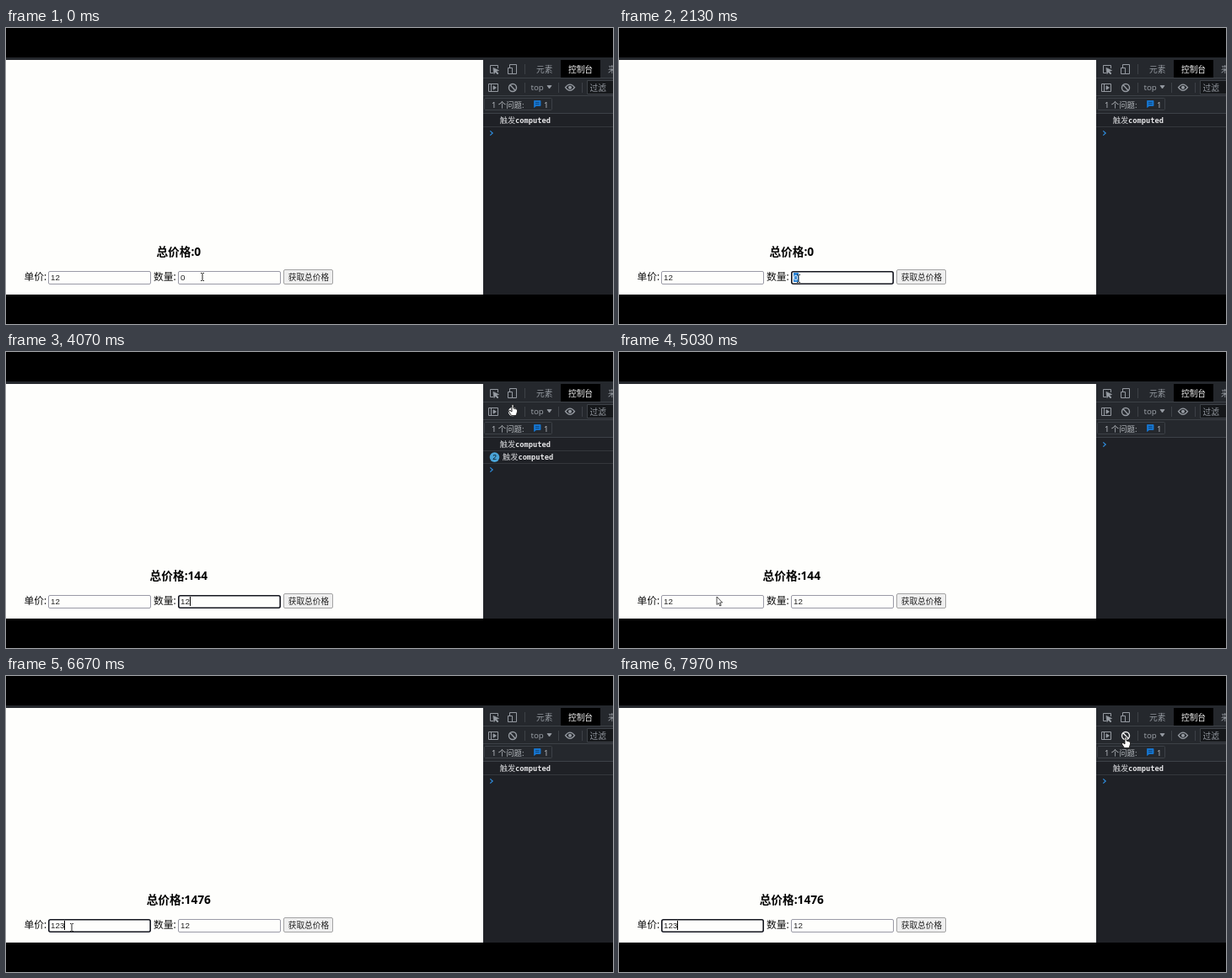
Animation of 720x352 px, one loop 8000 ms. Source, as an HTML page with a canvas:

```html
<!DOCTYPE html>
<html lang="zh-CN">
<head>
<meta charset="utf-8">
<title>Computed total</title>
<style>
  html, body { margin: 0; width: 100%; height: 100%; overflow: hidden; background: #000; }
  canvas { display: block; }
</style>
</head>
<body>
<canvas id="stage" width="720" height="352"></canvas>
<script>
const ctx = document.getElementById('stage').getContext('2d');
const LOOP = 8000;
const SANS = '"Noto Sans", "Noto Sans CJK SC", sans-serif';
const UI = '"Liberation Sans", "Noto Sans CJK SC", sans-serif';
const MONO = '"DejaVu Sans Mono", "Noto Sans CJK SC", monospace';
const PAGE = '#fefefc', PANEL = '#1f2126', BAR = '#25282d', LINE = '#3d4147', ICON = '#969ba2';

// Moments of the user's actions, in ms
const FOCUS_COUNT = 780, SELECT = 980, TYPE_1 = 2380, TYPE_2 = 2550;
const CLEAR = 4260, FOCUS_PRICE = 5500, TYPE_3 = 6450;

// Pointer path: time, x, y
const path = [
  [0, 233, 296], [350, 233, 296], [780, 213, 298], [2600, 213, 298],
  [2930, 496, 182], [3150, 496, 182], [3700, 601, 62], [4350, 601, 62],
  [5000, 116, 291], [5060, 116, 291], [5400, 78, 299], [6900, 78, 299],
  [7600, 601, 72], [LOOP, 601, 72]
];

function rect(x, y, w, h, color) {
  ctx.fillStyle = color;
  ctx.fillRect(x, y, w, h);
}

function box(x, y, w, h, fill, stroke, width = 1, radius = 0) {
  ctx.beginPath();
  ctx.roundRect(x, y, w, h, radius);
  if (fill) { ctx.fillStyle = fill; ctx.fill(); }
  if (stroke) { ctx.strokeStyle = stroke; ctx.lineWidth = width; ctx.stroke(); }
}

function text(str, x, y, size, color, family = UI, weight = 400, align = 'left') {
  ctx.font = `${weight} ${size}px ${family}`;
  ctx.textAlign = align;
  ctx.fillStyle = color;
  ctx.fillText(str, x, y);
}

function line(d, color, width = 1) {
  ctx.strokeStyle = color;
  ctx.lineWidth = width;
  ctx.stroke(new Path2D(d));
}

function shape(d, fill, stroke) {
  const p = new Path2D(d);
  ctx.fillStyle = fill;
  ctx.fill(p);
  ctx.strokeStyle = stroke;
  ctx.lineWidth = 0.8;
  ctx.stroke(p);
}

function field(x, value, focused, selected, caretAge) {
  if (focused) box(x + .8, 289.8, 120.4, 14.4, PAGE, '#14161f', 1.6, 2);
  else box(x + .5, 289.5, 121, 15, PAGE, '#9a9aa6', 1, 1.5);
  if (selected) rect(x + 3, 291, 6, 11, '#2f86d6');
  text(value, x + 3, 300, 9.8, selected ? '#fff' : '#222');
  if (focused && !selected && caretAge % 1060 < 530) {
    rect(Math.round(x + 3 + ctx.measureText(value).width), 291, 1, 11, '#000');
  }
}

function page(t) {
  rect(0, 35, 720, 3, BAR);
  rect(0, 38, 566, 279, PAGE);
  const price = t < TYPE_3 ? '12' : '123';
  const count = t < TYPE_1 ? '0' : t < TYPE_2 ? '1' : '12';
  text('总价格:' + price * count, 204.8, 270.7, 13.7, '#000', SANS, 700, 'center');
  text('单价:', 21.5, 300, 11.8, '#111', SANS);
  text('数量:', 175, 300, 11.8, '#111', SANS);
  const countTouched = t < TYPE_1 ? FOCUS_COUNT : t < TYPE_2 ? TYPE_1 : TYPE_2;
  const priceTouched = t < TYPE_3 ? FOCUS_PRICE : TYPE_3;
  field(50, price, t >= FOCUS_PRICE, false, t - priceTouched);
  field(204, count, t >= FOCUS_COUNT && t < CLEAR, t >= SELECT && t < TYPE_1, t - countTouched);
  box(329.5, 287.5, 58, 17, '#efefef', '#a3a3a3', 1, 1.5);
  text('获取总价格', 334.7, 299.7, 9.7, '#222');
}

function toolbar(clearHovered) {
  rect(566, 38, 154, 279, PANEL);
  rect(566, 38, 154, 64, BAR);
  rect(658, 38, 47, 21, '#000');
  for (const y of [59, 80, 101]) rect(566, y, 154, 1, LINE);
  for (const [x, y] of [[615, 43], [615, 65], [655, 65], [683, 65]]) rect(x, y, 1, 12, LINE);

  // Inspect and device icons
  line('M578 53.5H574.5V44.5H583.5V48', ICON);
  shape('M578 47.5L584.5 50.5L581.5 51.3L584 54L583 55L580.5 52.2L579 54.5Z', ICON, ICON);
  line('M597.5 47V43.5H605.5V54.5H600.5M595.5 47.5H600.5V54.5H595.5Z', ICON);
  text('元素', 629, 52.5, 9.7, ICON);
  text('控制台', 667, 52.5, 9.7, '#f4f4f4');
  text('来源', 714, 52.5, 9.7, ICON);

  // Sidebar, clear and eye icons
  line('M572.5 66.5H583.5V75.5H572.5ZM575.5 66.5V75.5', ICON);
  shape('M578 68.8L581.5 71L578 73.2Z', ICON, ICON);
  line('M605.5 71A4.5 4.5 0 1 1 596.5 71A4.5 4.5 0 1 1 605.5 71M598 67.8L604 74.2',
    clearHovered ? '#f2f2f2' : ICON, 1.4);
  text('top', 622.5, 74, 9.7, ICON, SANS);
  shape('M642 68.5H647L644.5 72Z', ICON, ICON);
  line('M663.5 70.7Q669 63.5 674.5 70.7Q669 78 663.5 70.7Z', ICON, 1.3);
  box(667, 68.7, 4, 4, ICON, null, 0, 2);
  box(689.5, 62.5, 40, 16, '#15171a', LINE);
  text('过滤', 692.5, 74.5, 9.7, ICON);

  box(567.5, 83.5, 80, 14, null, LINE, 1, 1);
  text('1 个问题:', 576, 94.5, 9.4, '#b6babf', SANS);
  shape('M626.5 86.5H634V92.5H629L626.5 94.5Z', '#1677d2', '#1677d2');
  line('M628 88.5H632.5M628 90.5H632.5', '#0c345f', .7);
  text('1', 638, 94.5, 9.4, '#b6babf', SANS);
}

function logLine(row, repeats) {
  const y = 110 + row * 15;
  let x = 585.7;
  if (repeats > 1) {
    box(573.7, y - 5.7, 11.6, 11.6, '#4aa3d6', null, 0, 5.8);
    text(repeats, 579.5, y + 3.3, 8.5, '#0a1a24', UI, 400, 'center');
    x = 589;
  }
  text('触发', x, y + 3.3, 9.2, '#d2d3d6', MONO);
  text('computed', x + 18.4, y + 3.3, 8.7, '#e8e8ea', MONO, 700);
  rect(566, y + 7, 154, 1, '#34373c');
}

function consoleLog(t) {
  const logs = [];
  if (t < CLEAR) {
    logs.push(1);
    if (t >= TYPE_1) logs.push(t < TYPE_2 ? 1 : 2);
  } else if (t >= TYPE_3) logs.push(1);
  logs.forEach((repeats, row) => logLine(row, repeats));
  const y = 110 + logs.length * 15;
  line(`M574.3 ${y - 2.6}L577.2 ${y}L574.3 ${y + 2.6}`, '#2f8fe0', 1.2);
}

function pointerAt(t) {
  const i = path.findIndex(k => k[0] > t);
  const [t0, x0, y0] = path[i - 1], [t1, x1, y1] = path[i];
  const u = (t - t0) / (t1 - t0), e = u * u * (3 - 2 * u);
  return [x0 + (x1 - x0) * e, y0 + (y1 - y0) * e];
}

function pointerKind(x, y) {
  const inside = (left, top, right, bottom) => x > left && x < right && y > top && y < bottom;
  if (inside(592, 60, 611, 80)) return 'hand';
  return inside(52, 292, 170, 303) || inside(206, 292, 324, 303) ? 'beam' : 'arrow';
}

function drawPointer(x, y, kind) {
  ctx.save();
  ctx.translate(x, y);
  if (kind === 'beam') {
    line('M-2 -4.5H-.5M.5 -4.5H2M0 -4V4M-2 4.5H-.5M.5 4.5H2', '#222');
  } else if (kind === 'arrow') {
    shape('M0 0V9.5L2.2 7.5L3.7 11L5.2 10.3L3.7 7H6.6Z', '#fff', '#222');
  } else {
    shape('M-1 1Q0 -1 1 1V5L4.5 6Q6 6.5 5.5 9L4 13.5H-1.5L-4.5 9Q-5 7 -3 7.5L-1 9Z', '#fff', '#111');
  }
  ctx.restore();
}

function render(now) {
  const t = now % LOOP;
  const [x, y] = pointerAt(t);
  const kind = pointerKind(x, y);
  rect(0, 0, 720, 352, '#000');
  page(t);
  toolbar(kind === 'hand');
  consoleLog(t);
  drawPointer(x, y, kind);
}

const start = performance.now();
function tick() {
  render(performance.now() - start);
  requestAnimationFrame(tick);
}
tick();
</script>
</body>
</html>
```
